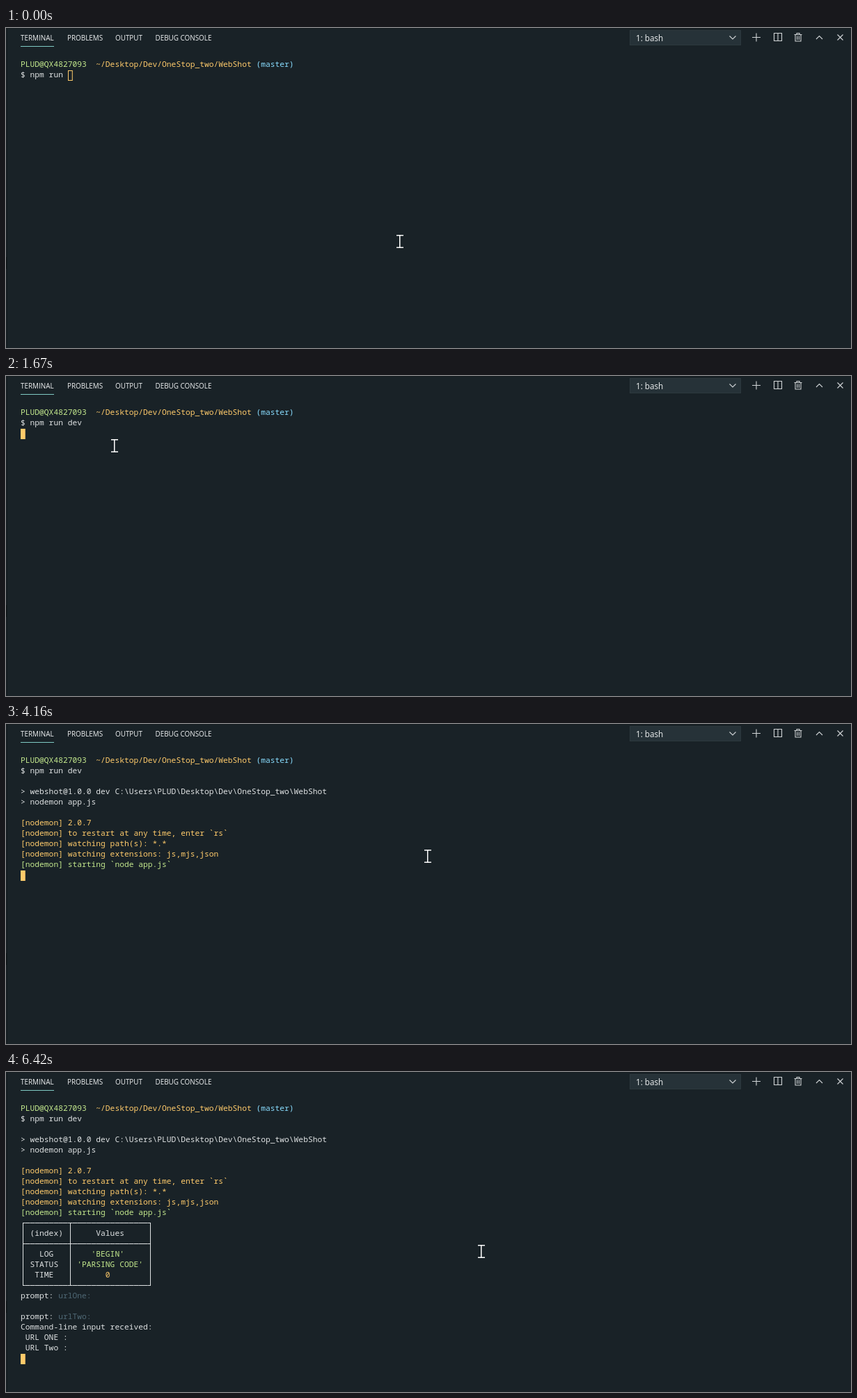
Write an HTML page with a canvas that moves like this. It is 1214 px wide and 461 px high and loops after 8000 ms.

```html
<!DOCTYPE html>
<html lang="en">
<head>
<meta charset="utf-8">
<title>Terminal</title>
<style>
  html, body { margin: 0; width: 100%; height: 100%; overflow: hidden; background: #192227; }
  canvas { display: block; }
</style>
</head>
<body>
<canvas id="stage" width="1214" height="461"></canvas>
<script>
const ctx = document.getElementById('stage').getContext('2d');
const LOOP = 8000, LEFT = 21, TOP = 46, CELL = 6.769, ROW = 15;
const BG = '#192227', FG = '#dfe2e3', GREEN = '#c3e88d', YELLOW = '#ffcb6b', CYAN = '#89ddff', DIM = '#4f6875';

// Pointer moves: start, ms per step, steps, then a quadratic curve.
const moves = [
  [70, 73.75, 8, [566, 308], [300, 180], [156, 101]],
  [3220, 77, 8, [156, 101], [246, 76], [430, 126]],
  [3920, 79, 7, [430, 126], [620, 170], [683, 259]],
];

// Cursor stops: time, column, row.
const stops = [
  [0, 10, 1], [1030, 11, 1], [1120, 12, 1], [1350, 13, 1], [1670, 0, 2],
  [3220, 0, 6], [3680, 0, 11], [4325, 0, 18], [5110, 17, 18], [6420, 0, 24],
];

function rect(x, y, w, h, color) {
  ctx.fillStyle = color;
  ctx.fillRect(x, y, w, h);
}

function line(path, color = '#d0d4d6') {
  ctx.strokeStyle = color;
  ctx.lineWidth = 1.1;
  ctx.stroke(new Path2D(path));
}

function label(text, x, y, size, weight = 500) {
  ctx.font = `${weight} ${size}px "Open Sans", "Noto Sans", sans-serif`;
  ctx.fillStyle = '#f0f2f3';
  ctx.fillText(text, x, y);
}

function boxGlyph(ch, x, y) {
  const cx = Math.floor(x + CELL / 2), cy = y + 6;
  const has = set => set.includes(ch);
  if (has('├┼┤└┴┘│')) rect(cx, y - 1, 1, 8, FG);
  if (has('┌┬┐├┼┤│')) rect(cx, cy, 1, 8, FG);
  if (has('─┬┐┼┤┴┘')) rect(x, cy, cx - x + 1, 1, FG);
  if (has('─┌┬├┼└┴')) rect(cx, cy, x + CELL - cx, 1, FG);
}

// Writes [text, color] runs into the character grid.
function write(row, ...runs) {
  let col = 0;
  ctx.font = '500 11.28px "Noto Sans Mono", "DejaVu Sans Mono", monospace';
  for (const [text, color = FG] of runs) {
    for (const ch of text) {
      const x = LEFT + CELL * col++, y = TOP + ROW * row;
      if (ch >= '─' && ch <= '╿') boxGlyph(ch, x, y);
      else {
        ctx.fillStyle = color;
        ctx.fillText(ch, x, y + 10);
      }
    }
  }
}

function drawHeader() {
  rect(0, 0, 1214, 461, BG);
  rect(0, 0, 1214, 1, '#151c20');
  rect(1, 0, 1, 461, '#12191c');
  rect(0, 330, 1, 17, '#0f1518');
  label('TERMINAL', 21, 18, 9.9);
  label('PROBLEMS', 88, 18, 9.9);
  label('OUTPUT', 157, 18, 9.9);
  label('DEBUG CONSOLE', 214.5, 18, 9.9);
  rect(21, 26, 48, 1, '#80cbc4');
  rect(896, 3, 160, 22, '#2d393e');
  rect(897, 4, 158, 20, '#263238');
  label('1: bash', 905, 19, 11.7, 400);
  line('M1039.5 11.5l4.5 4.5 4.5-4.5');
  line('M1072 13.5h12M1078 7.5v12');
  line('M1103.5 7.5h11v11h-11zM1109 7.5v11');
  line('M1132.5 9.5h11M1136 9.5v-2h4v2M1134 9.5v9.5h8v-9.5M1136.7 11.5v5.5M1139.3 11.5v5.5');
  line('M1164 16l4.5-4.5 4.5 4.5');
  line('M1194.5 9.5l8 8M1202.5 9.5l-8 8');
}

function drawText(t) {
  const typed = [1030, 1120, 1350].filter(at => t >= at).length;
  write(0, ['PLUD@QX4827093  ', GREEN], ['~/Desktop/Dev/OneStop_two/WebShot ', YELLOW], ['(master)', CYAN]);
  write(1, ['$ npm run ' + 'dev'.slice(0, typed)]);
  if (t >= 3220) {
    write(3, ['> webshot@1.0.0 dev C:\\Users\\PLUD\\Desktop\\Dev\\OneStop_two\\WebShot']);
    write(4, ['> nodemon app.js']);
  }
  if (t >= 3680) {
    ['2.0.7', 'to restart at any time, enter `rs`', 'watching path(s): *.*', 'watching extensions: js,mjs,json']
      .forEach((text, i) => write(6 + i, ['[nodemon] ' + text, YELLOW]));
    write(10, ['[nodemon] starting `node app.js`', GREEN]);
  }
  if (t >= 4325) {
    const rule = ([a, b, c]) => [a + '─'.repeat(9) + b + '─'.repeat(16) + c];
    write(11, rule('┌┬┐'));
    write(12, ['│ (index) │     Values     │']);
    write(13, rule('├┼┤'));
    write(14, ['│   LOG   │    '], ["'BEGIN'", GREEN], ['     │']);
    write(15, ['│ STATUS  │ '], ["'PARSING CODE'", GREEN], [' │']);
    write(16, ['│  TIME   │       '], ['0', YELLOW], ['        │']);
    write(17, rule('└┴┘'));
  }
  if (t >= 5110) write(18, ['prompt: '], ['urlOne:', DIM]);
  if (t >= 6420) {
    write(20, ['prompt: '], ['urlTwo:', DIM]);
    write(21, ['Command-line input received:']);
    write(22, [' URL ONE :']);
    write(23, [' URL Two :']);
  }
}

function drawCursor(t) {
  const [, col, row] = stops.findLast(stop => t >= stop[0]);
  const x = Math.round(LEFT + CELL * col), y = TOP + ROW * row;
  rect(x, y, CELL, ROW, YELLOW);
  if (t < 660) rect(x + 1, y + 1, CELL - 2, ROW - 2, BG);
}

function drawPointer(t) {
  const [start, dt, steps, a, b, c] = moves.findLast(move => t >= move[0]) || moves[0];
  const step = Math.floor((t - start) / dt) + 1;
  const u = Math.max(0, Math.min(1, step / steps));
  const [x, y] = a.map((p, i) => Math.round((1 - u) ** 2 * p + 2 * u * (1 - u) * b[i] + u * u * c[i]));
  rect(x - 5, y - 10, 10, 1.5, '#fff');
  rect(x - 1, y - 10, 1.5, 19, '#fff');
  rect(x - 5, y + 7.5, 10, 1.5, '#fff');
}

function frame() {
  const t = performance.now() % LOOP;
  drawHeader();
  drawText(t);
  drawCursor(t);
  drawPointer(t);
  requestAnimationFrame(frame);
}
frame();
</script>
</body>
</html>
```
